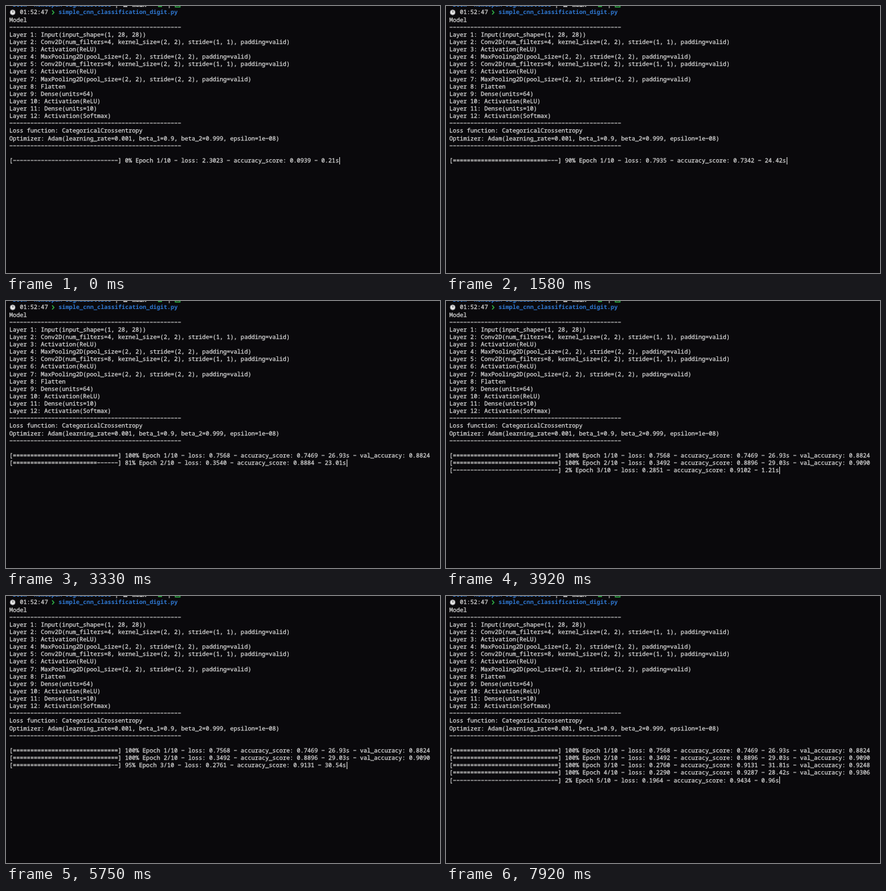
These frames come from a looping animation (651x401 px, 8000 ms). An HTML page:

```html
<!DOCTYPE html>
<html lang="en">
<head>
<meta charset="utf-8">
<title>Training log</title>
<style>
  html, body { margin: 0; width: 100%; height: 100%; overflow: hidden; background: #0a090c; }
  #stage { position: relative; width: 651px; height: 401px; overflow: hidden; }
  .text {
    position: absolute; white-space: pre; color: #dadada;
    font: 8.787px/11.13px "Noto Sans Mono", "DejaVu Sans Mono", monospace;
    -webkit-text-stroke: .25px currentColor;
    font-variant-ligatures: none; text-rendering: geometricPrecision;
  }
  .blue { color: #2f78d2; font-weight: 700; -webkit-text-stroke: 0; }
  .bold { font-weight: 700; }
  #cursor { position: absolute; width: 1px; height: 11px; background: #d8d8d8; }
  svg { position: absolute; left: 0; top: 0; }
</style>
</head>
<body>
<div id="stage">
  <svg width="651" height="20" fill="none">
    <circle cx="10" cy="9.6" r="3.8" fill="#e9e9e9" stroke="#8d8d92" stroke-width=".9"/>
    <path d="M10 7.2V9.6L11.4 8.6" stroke="#333" stroke-width=".8"/>
    <path d="M69.2 6.6L71.9 9.7L69.2 12.8" stroke="#2fae45" stroke-width="1.5"/>
    <path d="M176 0H182V1.5H176Z" fill="#c4c4c8"/>
    <path d="M228 .7H234M254 0V1.5H261V0" stroke="#2fae45" stroke-width="1.4"/>
  </svg>
  <div id="cursor"></div>
</div>
<script>
const LOOP = 8000, STEP = 1000 / 12;
const LEFT = 5, CELL = 5.272, TOP = 4.4, LINE = 11.13;
const FIRST_EPOCH_ROW = 20;
const stage = document.getElementById('stage');
const cursor = document.getElementById('cursor');

// Wide dashes, as in the terminal's typeface.
const dashes = text => text.replace(/-/g, '\u2212');

function put(col, row, text, style = '') {
  const el = document.createElement('div');
  el.className = 'text ' + style;
  el.style.left = LEFT + col * CELL + 'px';
  el.style.top = TOP + row * LINE + 'px';
  el.textContent = dashes(text);
  stage.append(el);
  return el;
}

const branchRow = -1.05;
put(1, branchRow, 'room', 'blue');
put(7, branchRow, 'Homespun-SignalLattice', 'blue');
put(30, branchRow, '|');
put(35, branchRow, 'main', 'bold');
put(45, branchRow, '|');
put(3, 0, '01:52:47');
put(14, 0, 'simple_cnn_classification_digit.py', 'blue');

const rule = '-'.repeat(49);
const conv = n => `Conv2D(num_filters=${n}, kernel_size=(2, 2), stride=(1, 1), padding=valid)`;
const pool = 'MaxPooling2D(pool_size=(2, 2), stride=(2, 2), padding=valid)';
const relu = 'Activation(ReLU)';
const layers = [
  'Input(input_shape=(1, 28, 28))', conv(4), relu, pool, conv(8), relu, pool,
  'Flatten', 'Dense(units=64)', relu, 'Dense(units=10)', 'Activation(Softmax)'
];
[
  'Model', rule,
  ...layers.map((layer, i) => `Layer ${i + 1}: ${layer}`),
  rule,
  'Loss function: CategoricalCrossentropy',
  'Optimizer: Adam(learning_rate=0.001, beta_1=0.9, beta_2=0.999, epsilon=1e-08)',
  rule
].forEach((text, i) => put(0, i + 1, text));

// start is in steps, seconds is the epoch's length, bend eases the bar;
// loss and accuracy run from their first to their final mean.
const epochs = [
  { start: -.165, seconds: 26.93, bend: 1.07, loss: [2.3317, .7568], accuracy: [.0794, .7469], val: '0.8824' },
  { start: 21.94, seconds: 29.03, bend: .9, loss: [.4476, .3492], accuracy: [.8602, .8896], val: '0.9090' },
  { start: 46.09, seconds: 31.81, bend: 1.1, pace: 1.333, loss: [.286, .276], accuracy: [.9099, .9131], val: '0.9248' },
  { start: 70.99, seconds: 28.42, bend: 1.02, loss: [.2698, .229], accuracy: [.9169, .9287], val: '0.9306' },
  { start: 94.246, seconds: 28, bend: 1.1, loss: [.1969, .19], accuracy: [.9437, .94] }
];
const PACE = 1.274; // logged seconds per step
epochs.forEach((epoch, i) => epoch.row = put(0, FIRST_EPOCH_ROW + i, ''));

// Running mean of an exponential decay, scaled to go from one value to the other.
function runningMean([from, to], p, decay) {
  const mean = x => decay * (1 - Math.exp(-x / decay)) / x;
  return to + (from - to) * (mean(p) - mean(1)) / (1 - mean(1));
}

function progress({ start, seconds, bend, pace = PACE, loss, accuracy }, index, step) {
  const elapsed = Math.min(seconds, (step - start) * pace);
  const p = (elapsed / seconds) ** bend;
  const done = Math.floor(p * 30);
  return `[${'='.repeat(done)}${'-'.repeat(30 - done)}] ${Math.floor(p * 100)}% ` +
    `Epoch ${index + 1}/10 - loss: ${runningMean(loss, p, .179).toFixed(4)} - ` +
    `accuracy_score: ${runningMean(accuracy, p, .148).toFixed(4)} - ${elapsed.toFixed(2)}s`;
}

function draw(time) {
  const step = Math.floor((time + 3.4) / STEP);
  epochs.forEach((epoch, i) => {
    const following = epochs[i + 1];
    const started = step > epoch.start;
    const finished = following && step > following.start;
    let text = started ? progress(epoch, i, step) : '';
    if (finished) text += ` - val_accuracy: ${epoch.val}`;
    epoch.row.textContent = dashes(text);
    if (started && !finished) {
      cursor.style.left = Math.floor(LEFT + text.length * CELL) + 'px';
      cursor.style.top = Math.floor(TOP + (FIRST_EPOCH_ROW + i) * LINE) + 'px';
    }
  });
}

const start = performance.now();
function tick() {
  draw((performance.now() - start) % LOOP);
  requestAnimationFrame(tick);
}
tick();
</script>
</body>
</html>
```
